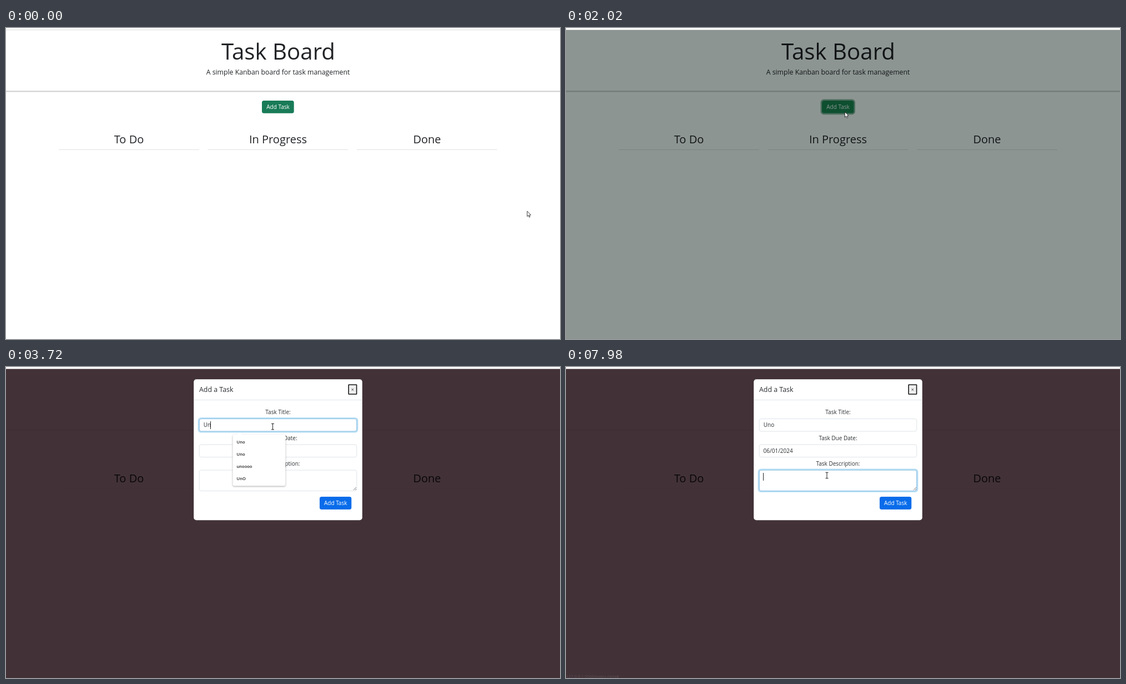
An HTML page with a canvas for the animation above (8 s loop, 998x561 px).

```html
<!DOCTYPE html>
<html lang="en">
<head>
<meta charset="utf-8">
<title>Task Board</title>
<style>
  html, body { margin: 0; width: 100%; height: 100%; overflow: hidden; background: #fff; }
  canvas { display: block; width: 998px; height: 561px; }
</style>
</head>
<body>
<canvas id="stage" width="998" height="561"></canvas>
<script>
const W = 998, H = 561, LOOP = 8000;
const screen2d = document.getElementById('stage').getContext('2d');
const layer = document.createElement('canvas');
layer.width = W;
layer.height = H;
const layer2d = layer.getContext('2d');
let c = screen2d;

const SANS = '"Open Sans", "Noto Sans", sans-serif';
const ARIAL = '"Liberation Sans", Arial, sans-serif';
const INK = '#2b2e31';

const clamp = v => Math.max(0, Math.min(1, v));
const ramp = (t, a, b) => clamp((t - a) / (b - a));
const lerp = (a, b, k) => a + (b - a) * k;

function text(str, x, y, size, color, align = 'left', font = SANS, weight = 400) {
  c.font = `${weight} ${size}px ${font}`;
  c.textAlign = align;
  c.fillStyle = color;
  c.fillText(str, x, y);
}

function rect(x, y, w, h, color) {
  c.fillStyle = color;
  c.fillRect(x, y, w, h);
}

function paint(fill, stroke, lw) {
  if (fill) { c.fillStyle = fill; c.fill(); }
  if (stroke) { c.strokeStyle = stroke; c.lineWidth = lw; c.stroke(); }
}

function box(x, y, w, h, r, fill, stroke, lw = 1) {
  c.beginPath();
  c.roundRect(x, y, w, h, r);
  paint(fill, stroke, lw);
}

function poly(points, fill, stroke, lw = 1) {
  c.beginPath();
  points.forEach(([x, y]) => c.lineTo(x, y));
  c.closePath();
  paint(fill, stroke, lw);
}

function faded(alpha, draw) {
  if (alpha <= 0) return;
  c.save();
  c.globalAlpha *= alpha;
  draw();
  c.restore();
}

// Page

// The backdrop multiplies the page: clear, then half dark, then fully dark
function backdropTint(t) {
  const clear = [255, 255, 255], half = [140, 149, 146], dark = [66, 50, 56];
  const mix = (a, b, k) => a.map((v, i) => lerp(v, b[i], k));
  return t < 2020 ? mix(clear, half, ramp(t, 1928, 2020)) : mix(half, dark, ramp(t, 2020, 2078));
}

function drawPage(t) {
  const tint = backdropTint(t);
  const shade = (...rgb) => `rgb(${rgb.map((v, i) => Math.round(v * tint[i] / 255))})`;
  const ink = shade(33, 35, 38);
  rect(0, 0, W, H, '#fff');
  rect(0, 3, W, 1, '#dcdcdc');
  rect(0, t < 1928 ? 4 : 3.6, W, H, shade(255, 255, 255));

  text('Task Board', 490.4, 57, 40.2, ink, 'center');
  text('A simple Kanban board for task management', 490, 84, 12.25, ink, 'center');
  // The rules melt into the dark backdrop
  faded(1 - 0.8 * ramp(t, 2020, 2078), () => {
    rect(0, 113, W, 2.5, shade(214, 214, 215));
    for (let i = 0; i < 3; i++) rect(95 + i * 268.5, 219, 253, 1, shade(222, 226, 228));
  });

  faded(ramp(t, 1830, 1930), () =>
    box(459.8, 129.8, 59.9, 25.2, 4.5, null, shade(140, 185, 163), 2.5));
  box(461, 131, 57.7, 22.7, 3.5, t > 1540 ? shade(25, 135, 84) : shade(25, 123, 88));
  text('Add Task', 490, 146, 10, shade(255, 255, 255), 'center');

  ['To Do', 'In Progress', 'Done'].forEach((name, i) =>
    text(name, 221.5 + i * 268.5, 208, 20, ink, 'center'));
}

// Dialog

function field(y, h, focus) {
  box(348.2, y, 283.6, h, 3.5, null, '#dee4e8');
  faded(focus, () => {
    box(346.8, y - 1.4, 286.4, h + 2.8, 4.5, null, '#b9dff5', 2.4);
    box(348.2, y, 283.6, h, 3.5, null, '#86bfe6');
  });
}

const caret = (x, y) => rect(x, y, 1, 14, '#222');
const blinkOn = (t, start) => Math.floor((t - start) / 530) % 2 === 0;

function drawDialog(t, opacity) {
  const hoverAdd = t > 5940 && t < 6260;
  const toDate = ramp(t, 4970, 5130), toText = ramp(t, 7500, 7650);
  const panel = [218, 255, 246].map(v => lerp(v, 255, ramp(opacity, 0.5, 1)));
  box(338, 22, 304, 254.5, 5, `rgb(${panel})`, 'rgba(20,10,14,.25)');
  text('Add a Task', 348, 45, 12.4, INK);
  rect(338.5, 59, 303, 1, '#dfe6ea');
  box(617.2, 32, 14.4, 17, 0.5, '#efefef', '#151515', 1.6);
  text('×', 624.4, 44, 9, '#333', 'center');

  ['Task Title:', 'Task Due Date:', 'Task Description:'].forEach((label, i) =>
    text(label, 490, 85 + i * 46.5, 10, INK, 'center'));
  field(93.5, 22.5, ramp(t, 3000, 3140) * (1 - toDate));
  field(140, 22.5, toDate * (1 - toText));
  field(186, 37.5, toText);
  for (const s of [5, 2]) poly([[631 - s, 222], [631, 222 - s]], null, '#777', 0.8);

  const typed = 'Uno'.slice(0, (t >= 3470) + (t >= 3690) + (t >= 4380));
  text(typed, 355.8, 108, 10, INK);
  if (t >= 2860 && t < 4970 && !(t >= 4220 && t < 4380))
    caret(355 + Math.round(c.measureText(typed).width), 98);

  const picked = t >= 7020;
  if (picked) text('06/01/2024', 355.6, 154.5, 10, INK);
  if (t >= 4970 && t < 7500 && blinkOn(t, picked ? 7020 : 4960)) caret(picked ? 408 : 355, 144);
  if (t >= 7500) caret(355, 191);

  box(565, 234, 57.3, 23, 3.5, hoverAdd ? '#0b5ed0' : '#086cea');
  text('Add Task', 593.7, 249, 10, '#fff', 'center');
}

function drawSuggestions(t) {
  if (t >= 4980) return;
  const rows = ['Uno', 'Uno', 'unoooo', 'UnO', 'Dos', 'Tres'].slice(0, t < 3500 ? 6 : 4);
  faded(ramp(t, 3040, 3120), () => {
    c.save();
    c.shadowColor = 'rgba(0,0,0,.35)';
    c.shadowBlur = 3;
    c.shadowOffsetY = 1;
    box(408.5, 122, 95, rows.length * 22 + 4.5, 3, '#fff');
    c.restore();
    poly([[417, 122.5], [421, 118], [425, 122.5]], '#fff');
    rows.forEach((row, i) => text(row, 415.6, 137.8 + i * 22, 7.5, '#1d1d1f', 'left', SANS, 600));
  });
}

// Calendar

function arrowIcon(x, dir) {
  c.beginPath();
  c.arc(x, 176, 4.2, 0, Math.PI * 2);
  paint('#333');
  poly([[x + dir * 2, 176], [x - dir, 173.8], [x - dir, 178.2]], '#fff');
}

function drawDay(day, hover) {
  const slot = day + 5;
  const x = 351.3 + slot % 7 * 23.2, y = 214.5 + Math.floor(slot / 7) * 19.1;
  const [fill, edge, ink] = day === 2 ? ['#f6e7a2', '#dccb72', '#858040']
    : hover ? ['#ededed', '#aaa', '#2b2b2b'] : ['#f6f6f6', '#c5c5c5', '#454545'];
  box(x, y, 20.8, 16.5, 0, fill, edge, 0.8);
  text(day, x + 18.8, y + 11.2, 9, ink, 'right', ARIAL);
}

function drawCalendar(t) {
  faded(ramp(t, 4975, 5160) * (1 - ramp(t, 7040, 7220)), () => {
    box(348.4, 163.5, 165, 168, 1.5, '#fff', '#c9c9c9', 0.8);
    box(350.4, 165.4, 160.8, 21.8, 1.5, '#e6eeec', '#d9dfdd', 0.8);
    text('June 2024', 430.7, 179.4, 10, '#333', 'center', ARIAL, 700);
    arrowIcon(361.3, -1);
    arrowIcon(500.4, 1);
    ['Su', 'Mo', 'Tu', 'We', 'Th', 'Fr', 'Sa'].forEach((name, i) =>
      text(name, 362 + i * 23.1, 203, 9, '#333', 'center', ARIAL, 700));
    for (let day = 1; day <= 30; day++) drawDay(day, day === 1 && t > 6540);
  });
}

function drawStatus(t) {
  const show = ramp(t, 6670, 6790);
  faded(show * (1 - ramp(t, 7250, 7650)), () => rect(0, 548, 106, 13, '#3a3335'));
  faded(show * lerp(1, 0.22, ramp(t, 7250, 7800)), () =>
    text('127.0.0.1:5500/index.html#', 0, 560.5, 7.5, '#b8b0b2'));
}

// Pointer

// Each move: start, end, goal x, goal y, sideways bend x, y
const moves = [
  [790, 1100, 870, 133, 60, 0],
  [1330, 1700, 502, 151, 8, 117],
  [2020, 2140, 818, 306, 0, 0],
  [2150, 2350, 752, 276, 0, 0],
  [2550, 2860, 480.5, 107.5, 0, 0],
  [5820, 6150, 600, 244, 0, 0],
  [6200, 6570, 506, 224, 0, 0],
  [7150, 7470, 470, 195.5, 0, 0]
];

function pointerAt(t) {
  let x = 938.5, y = 330;
  for (const [start, end, goalX, goalY, bendX, bendY] of moves) {
    const k = 1 - Math.pow(1 - ramp(t, start, end), 3);
    const bend = 4 * k * (1 - k);
    x = lerp(x, goalX, k) + bendX * bend;
    y = lerp(y, goalY, k) + bendY * bend;
  }
  return [x, y];
}

function pointerKind(t, x, y) {
  const inside = (l, top, r, b) => x >= l && x <= r && y >= top && y <= b;
  if (t < 1928) return inside(461, 131, 519, 154) ? 'hand' : 'arrow';
  if (t < 2500) return 'arrow';
  if (inside(565, 234, 622, 257)) return 'hand';
  if (t > 5000 && t < 7220 && inside(348, 163, 513, 332))
    return inside(490, 214, 511, 231) ? 'hand' : 'arrow';
  const typing = [[93, 116], [140, 163], [186, 224]].some(([a, b]) => inside(348, a, 632, b));
  return typing ? 'beam' : 'arrow';
}

function drawPointer(t) {
  const [x, y] = pointerAt(t);
  const kind = pointerKind(t, x, y);
  c.save();
  c.translate(x, y);
  c.lineJoin = 'round';
  if (kind === 'beam') {
    rect(-0.5, -5.5, 1, 11, '#222');
    for (const s of [-5.8, 4.8]) rect(-2.5, s, 5, 1, '#222');
  } else if (kind === 'hand') {
    poly([[-1, 0], [1, 0], [1, 4], [5.5, 5], [6, 8], [4.5, 12], [-1.5, 12], [-4, 7.5], [-3, 6.5], [-1, 8]],
      '#fff', '#222', 0.9);
  } else {
    poly([[0.4, 0.4], [0.4, 10], [2.5, 8], [4.1, 11.4], [5.6, 10.7], [4.1, 7.5], [7, 7.2]],
      '#fff', '#26262a', 0.9);
  }
  c.restore();
}

function drawModal(t) {
  const opacity = ramp(t, 2068, 2218);
  if (opacity === 0) return;
  c = layer2d;
  c.clearRect(0, 0, W, H);
  drawDialog(t, opacity);
  c = screen2d;
  c.save();
  c.beginPath();
  c.rect(0, 4, W, H - 4);
  c.clip();
  c.globalAlpha = opacity;
  c.drawImage(layer, 0, Math.round(-31 * Math.pow(1 - ramp(t, 2075, 2375), 1.75)));
  c.restore();
  drawSuggestions(t);
  drawCalendar(t);
  drawStatus(t);
}

function render(t) {
  drawPage(t);
  drawModal(t);
  drawPointer(t);
}

let start = null;
function tick(now) {
  if (start === null) start = now;
  render((now - start) % LOOP);
  requestAnimationFrame(tick);
}
render(0);
requestAnimationFrame(tick);
</script>
</body>
</html>
```
